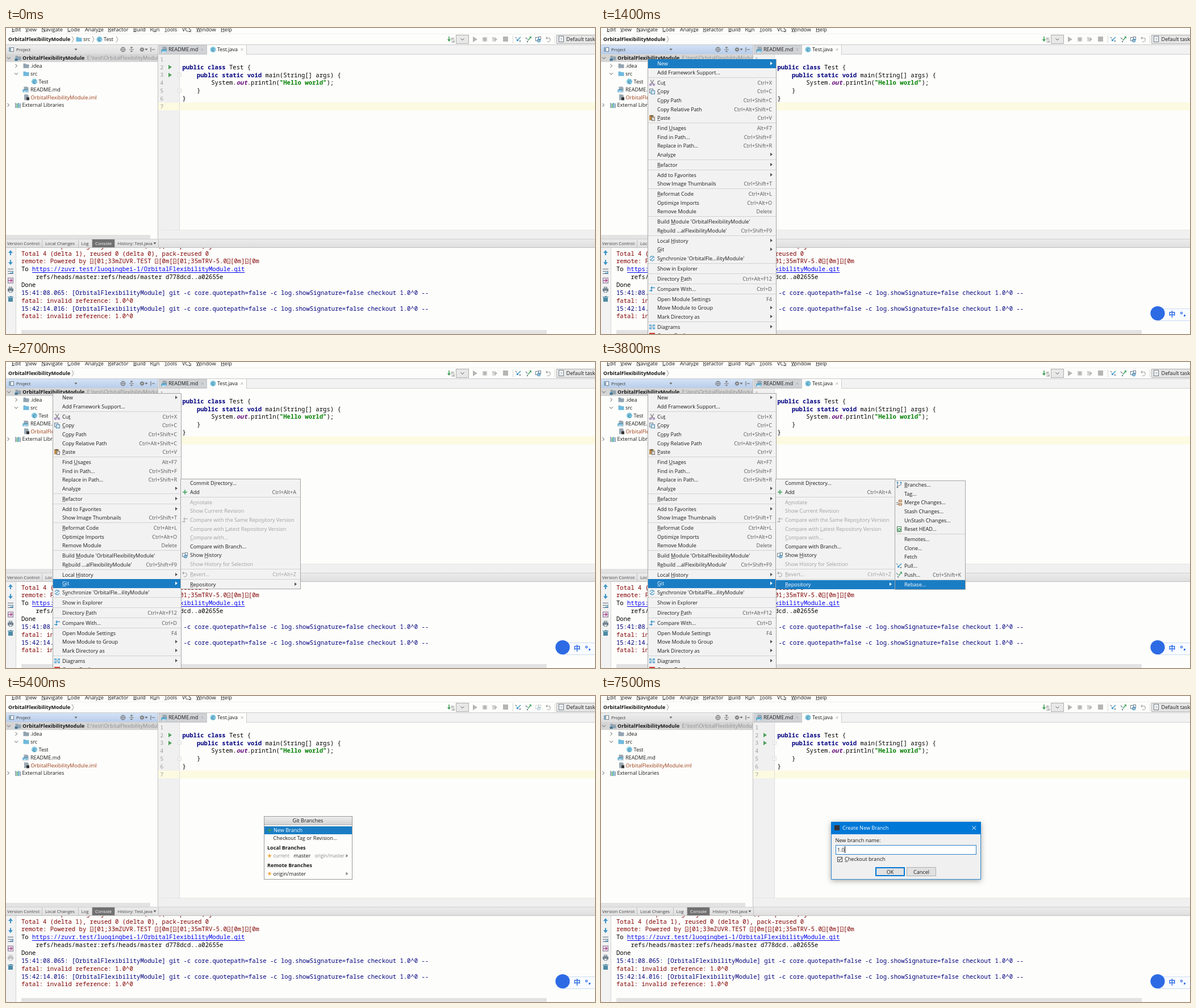
Recreate the animation shown at these times as an HTML page with a canvas. Size 1037x540 px, loop 8 s.

```html
<!DOCTYPE html>
<html lang="en">
<head>
<meta charset="utf-8">
<title>Creating a branch</title>
<style>
html, body { margin: 0; width: 100%; height: 100%; overflow: hidden; background: #fff; }
canvas { display: block; }
</style>
</head>
<body>
<canvas id="stage" width="1037" height="540"></canvas>
<script>
const ctx = document.getElementById('stage').getContext('2d');
const LOOP = 8000, ROW = 13.86;
const UI_FAMILY = '"Open Sans", "Noto Sans", sans-serif';
const MONO_FAMILY = '"Noto Sans Mono", "DejaVu Sans Mono", monospace';
const UI = `9.1px ${UI_FAMILY}`, BOLD = `bold 9px ${UI_FAMILY}`, SMALL = `7.8px ${UI_FAMILY}`, HINT = `8.3px ${UI_FAMILY}`;
const MONO = `10.58px ${MONO_FAMILY}`, MONO_BOLD = `bold ${MONO}`;
const PAPER = '#fdfdfb', INK = '#1a1a1a', GREY = '#8c8c8c', SELECT = '#1a7dc4';
const BLUE = '#3c94c8', GREEN = '#4aa564', STEEL = '#6e7f8c';
const PROJECT = 'OrbitalFlexibilityModule';

function rect(x, y, w, h, fill, border) {
  ctx.fillStyle = fill;
  ctx.fillRect(x, y, w, h);
  if (border) {
    ctx.strokeStyle = border;
    ctx.lineWidth = 1;
    ctx.strokeRect(x + .5, y + .5, w - 1, h - 1);
  }
}
function line(color, width, ...p) {
  ctx.strokeStyle = color;
  ctx.lineWidth = width;
  ctx.beginPath();
  for (let i = 0; i < p.length; i += 2) ctx.lineTo(p[i], p[i + 1]);
  ctx.stroke();
}
function shape(color, ...p) {
  ctx.fillStyle = color;
  ctx.beginPath();
  for (let i = 0; i < p.length; i += 2) ctx.lineTo(p[i], p[i + 1]);
  ctx.fill();
}
function disc(x, y, r, color) {
  ctx.fillStyle = color;
  ctx.beginPath();
  ctx.arc(x, y, r, 0, 7);
  ctx.fill();
}
function ring(x, y, r, color, from = 0, to = 6.3) {
  ctx.strokeStyle = color;
  ctx.lineWidth = 1.2;
  ctx.beginPath();
  ctx.arc(x, y, r, from, to);
  ctx.stroke();
}
function vGradient(x, y, w, h, top, bottom) {
  const g = ctx.createLinearGradient(0, y, 0, y + h);
  g.addColorStop(0, top);
  g.addColorStop(1, bottom);
  rect(x, y, w, h, g);
}
// Text is centred on y; "&" underlines the next character.
function text(s, x, y, color = INK, font = UI, align = 'left') {
  const mark = s.indexOf('&'), plain = s.replace('&', '');
  const base = y + (font.includes('Mono') ? 3.7 : 3.2);
  ctx.font = font;
  ctx.textAlign = align;
  ctx.fillStyle = color;
  ctx.fillText(plain, x, base);
  if (mark >= 0) {
    const from = ctx.measureText(plain.slice(0, mark)).width;
    ctx.fillRect(x + from, base + 1, ctx.measureText(plain[mark]).width, .6);
  }
  return x + ctx.measureText(plain).width;
}
const right = (x, y, c) => shape(c, x - 2, y - 3, x + 2, y, x - 2, y + 3);
const down = (x, y, c) => shape(c, x - 2.5, y - 1.5, x + 2.5, y - 1.5, x, y + 1.8);
const chevron = (x, y, open) => open
  ? line('#555', 1, x - 3, y - 1.5, x, y + 1.5, x + 3, y - 1.5)
  : line('#555', 1, x - 1.5, y - 3, x + 1.5, y, x - 1.5, y + 3);
const crumb = (x, y) => line('#999', 1, x - 1.5, y - 5.5, x + 1.5, y, x - 1.5, y + 5.5);

const page = () => shape('#9aa8b2', -4, -5, 2, -5, 4, -3, 4, 5, -4, 5);
const folder = color => shape(color, -5, -4, -1, -4, 0, -2.7, 5, -2.7, 5, 4, -5, 4);
function compare(color) {
  line(color, 1.4, 5, -2, -1, -2);
  shape(color, -3, -2, 0, -5, 0, 1);
  line(color, 1.4, -5, 3, -2, 3);
  shape(color, 1, 3, -2, 0, -2, 5);
}
function history(color) {
  rect(-5, -4, 7, 7, '#fff', color);
  rect(0, -5, 5, 6, '#fff', color);
  ring(1, 2, 2.6, BLUE);
}
const icons = {
  folder: () => folder('#92a3b0'),
  source: () => folder('#70b9dc'),
  module() { folder('#92a3b0'); rect(-6, 1, 5, 4, '#45799b'); },
  klass() { disc(0, 0, 5, '#7cc4e0'); text('C', 0, 0, '#2f5f78', `8px ${UI_FAMILY}`, 'center'); },
  doc() { page(); rect(-6, 0, 9, 5, '#3f9bc6'); text('MD', -5, 2.6, '#fff', `bold 5px ${UI_FAMILY}`); },
  iml() { page(); rect(0, 0, 5, 5, '#333'); },
  books() { ['#8fa0ae', '#52a86c', '#3f9bc6', '#8fa0ae'].forEach((c, i) => rect(-5 + i * 2.7, -4 + i % 2, 1.8, 9 - i % 2, c)); },
  cut() { line('#777', 1.2, -3, -5, 2, 3); line('#777', 1.2, 3, -5, -2, 3); ring(-3, 3.5, 1.5, '#8a66a8'); ring(3, 3.5, 1.5, '#8a66a8'); },
  copy() { rect(-5, -5, 7, 8, '#d9e4ea', STEEL); rect(-2, -2, 7, 7, '#d9e4ea', '#4b8db4'); },
  paste() { rect(-5, -5, 8, 9, '#bd8c4a'); rect(-3, -5, 4, 2, '#555'); rect(-1, -2, 6, 7, '#dadada', '#777'); },
  sync() { ring(0, 0, 4, BLUE, .3, 2.8); ring(0, 0, 4, BLUE, 3.4, 6); line(BLUE, 1.2, -2, 2, 2, -2); },
  compare: () => compare(BLUE),
  compareOff: () => compare('#b8b8b8'),
  diagram() { for (const x of [-5, 1]) for (const y of [-4, 1]) rect(x, y, 4, 3, '#e0edf3', BLUE); line(STEEL, 1, -1, 0, 1, 0); },
  red: () => rect(-5, -5, 10, 10, '#d23b35'),
  add() { line('#3a9b55', 1.5, -4, 0, 4, 0); line('#3a9b55', 1.5, 0, -4, 0, 4); },
  history: () => history(STEEL),
  historyOff() { ctx.globalAlpha = .4; history('#999'); ctx.globalAlpha = 1; },
  undo() { ring(0, 1, 3.3, '#ababab', -1.8, 2.2); line('#ababab', 1.2, -1, -2.2, -4, -2.2); shape('#ababab', -5, -2.2, -2, -5, -2, .6); },
  branch() { line('#8897a3', 1.2, -3, 4, -3, -3); line('#8897a3', 1.2, -3, 2, 3, 0, 3, -3); disc(-3, -4, 1.4, BLUE); disc(-3, 4, 1.4, STEEL); disc(3, -4, 1.4, BLUE); },
  merge() { rect(-1, -5, 6, 4, '#e8c9a8', '#a97849'); rect(-1, 1, 6, 4, '#e8c9a8', '#a97849'); line('#777', 1.2, -5, 0, -1, 0); line('#777', 1, -5, 3, -1, 3); },
  reset() { rect(-4, -5, 8, 10, '#eef3ee', '#4f7e5d'); ring(0, 1, 2.2, '#2c964b'); },
  pull() { line(BLUE, 1.5, 4, -4, -1, 1); shape(BLUE, -3, 3, -3, -1, 1, 3); line(STEEL, 1.2, -5, -4, -3, -2); disc(3, 3, 1.2, STEEL); },
  push() { line(GREEN, 1.5, -1, 2, 3, -3); shape(GREEN, 5, -5, 1, -5, 5, -1); line(STEEL, 1.2, -5, -3, -2, 0); disc(-2, 4, 1.2, STEEL); },
  up() { line(BLUE, 2, 0, 4, 0, -1); shape(BLUE, 0, -5, -4, 0, 4, 0); },
  down() { line(BLUE, 2, 0, -4, 0, 1); shape(BLUE, 0, 5, -4, 0, 4, 0); },
  wrap() { for (const y of [-4, 0, 4]) line(STEEL, 1.2, -5, y, 5, y); line(BLUE, 1.2, 4, 0, 4, 3, -1, 3); },
  end() { rect(-5, -5, 10, 10, '#e7dfe9', '#8b7594'); shape('#b44e93', 0, -3, 4, 0, 0, 3); line('#b44e93', 1.4, -4, 0, 0, 0); },
  print(color = STEEL) { rect(-3, -5, 6, 3, '#eee', color); rect(-5, -2, 10, 5, color); rect(-3, 1, 6, 4, '#fff', color); },
  printOff: () => icons.print('#bdbdbd'),
  trash() { rect(-4, -2, 8, 7, '#4d8ba5'); rect(-5, -4, 10, 1.4, '#4d8ba5'); rect(-1, -5, 3, 1, '#4d8ba5'); },
  star() {
    const p = [];
    for (let i = 0; i < 10; i++) { const a = i * Math.PI / 5, r = i % 2 ? 1.7 : 4; p.push(r * Math.sin(a), -r * Math.cos(a)); }
    shape('#f3aa45', ...p);
  },
  bug() { disc(0, 0, 3.4, '#b9b9b9'); for (const y of [-3, 0, 3]) line('#b9b9b9', 1, -4.5, y, 4.5, y); },
  cover() { rect(-5, -4, 6, 8, '#d8d8d8'); right(2, 0, '#b2b2b2'); line('#bebebe', 1, -5, -4, 1, 4); },
  gear() {
    for (let a = 0; a < 3; a += .785) {
      const x = 4 * Math.cos(a), y = 4 * Math.sin(a);
      line('#777', 1.4, x, y, -x, -y);
    }
    disc(0, 0, 2.8, '#777');
    disc(0, 0, 1.2, '#e4e4e4');
  },
  target() { ring(0, 0, 3.8, '#777'); line('#777', 1, -4, 0, 4, 0); line('#777', 1, 0, -4, 0, 4); },
  fold() { line('#777', 1, -4, 0, 4, 0); down(0, -3, '#777'); shape('#777', -2.5, 4, 2.5, 4, 0, 1.5); },
  hide() { line('#777', 1.2, -3, -4, -3, 4); line('#777', 1.2, -1, 0, 4, 0); }
};
function icon(name, x, y) {
  ctx.save();
  ctx.translate(x, y);
  icons[name]();
  ctx.restore();
}

// Items: "icon|label|shortcut"; ">" is a submenu, "!" a disabled label, "-" a separator.
const MAIN = { x: 82, y: 55, w: 227, first: 63, bottom: 545, items: [
  '|New|>', '|Add Framework Support...', '-',
  'cut|Cu&t|Ctrl+X', 'copy|&Copy|Ctrl+C', '|C&opy Path|Ctrl+Shift+C', '|Copy Relative Path|Ctrl+Alt+Shift+C', 'paste|&Paste|Ctrl+V', '-',
  '|Find &Usages|Alt+F7', '|Find in Path...|Ctrl+Shift+F', '|Replace in Path...|Ctrl+Shift+R', '|Analy&ze|>', '-',
  '|&Refactor|>', '-', '|Add to F&avorites|>', '|Show Image Thumbnails|Ctrl+Shift+T', '-',
  '|&Reformat Code|Ctrl+Alt+L', '|Optimi&ze Imports|Ctrl+Alt+O', '|Remove Module|Delete', '-',
  `|Build &Module '${PROJECT}'`, `|R&ebuild ...${PROJECT.slice(-19)}'|Ctrl+Shift+F9`, '-',
  '|Local &History|>', '|&Git|>', `sync|S&ynchronize '${PROJECT.slice(0, 10)}...${PROJECT.slice(-11)}'`, '-',
  '|Show in Explorer', '-', '|Directory &Path|Ctrl+Alt+F12', '-', 'compare|Compare With...|Ctrl+D', '-',
  '|Open Module Settings|F4', '|Move Module to Group|>', '|Mark Directory as|>', '-',
  'diagram|Diagrams|>', 'red|Create Draft...' ] };
const GIT = { x: 307, y: 206, w: 212, first: 214, bottom: 401, items: [
  '|Commit D&irectory...', 'add|Add|Ctrl+Alt+A', '-', '|!A&nnotate', '|!Show Current Revision',
  'compareOff|!Compare with the Same Repo&sitory Version', '|!Compare with &Latest Repository Version',
  '|!&Compare with...', '|Compare with Branch...', 'history|Show &History', '|!Show History for Selection', '-',
  'undo|!&Revert...|Ctrl+Alt+Z', '-', '|&Repository|>' ] };
const REPO = { x: 517, y: 209, w: 125, first: 217, bottom: 402, items: [
  'branch|&Branches...', '|Tag...', 'merge|Merge Changes...', '|Stash Changes...', '|UnStash Changes...',
  'reset|Reset HEAD...', '-', '|Remotes...', '|Clone...', '|Fetch', 'pull|Pull...', 'push|Push...|Ctrl+Shift+K', '-', '|Rebase...' ] };

function drawMenu({ x, y, w, first, bottom, items }, hover) {
  rect(x, y, w, bottom - y, '#f2f2f2', '#a6a6a6');
  let cy = first;
  for (const item of items) {
    if (item === '-') {
      rect(x + 1, Math.round(cy - 7.3), w - 2, 1, '#d2d2d2');
      cy += 2.3;
      continue;
    }
    const [name, label, keys = ''] = item.split('|');
    const plain = label.replace('&', ''), off = label[0] === '!';
    const hot = hover.some(h => plain.startsWith(h));
    if (hot) rect(x + 1, Math.round(cy - 8), w - 2, 16, SELECT);
    if (name) icon(name, x + 8, cy);
    text(label.replace('!', ''), x + 17, cy, hot ? '#fff' : off ? '#a0a0a0' : INK);
    if (keys === '>') right(x + w - 9, cy - .5, hot ? '#fff' : '#555');
    else text(keys, x + w - 8, cy, hot ? '#fff' : off ? '#a0a0a0' : '#555', UI, 'right');
    cy += 15.6;
  }
}

function drawToolbar(s) {
  const menus = { '&Edit': 10, '&View': 34, '&Navigate': 62.5, '&Code': 108, 'Analy&ze': 139, '&Refactor': 179.5, '&Build': 224,
    'R&un': 253.5, '&Tools': 279, 'VC&S': 310, '&Window': 335, '&Help': 378 };
  for (const name in menus) text(name, menus[name], 2.3, INK, `9.2px ${UI_FAMILY}`);
  rect(0, 10, 1037, 1, '#f0f0f0');
  text(PROJECT, 4, 20, INK, BOLD);
  crumb(117.5, 20);
  if (s.crumbs) {
    icon('source', 128.5, 20);
    text('src', 136, 20);
    crumb(153.5, 20);
    icon('klass', 164.5, 20);
    text('Test', 172, 20);
    crumb(195.5, 20);
  }
  line('#389b50', 1.5, 780, 15, 780, 22);
  shape('#389b50', 777, 20, 783, 20, 780, 24);
  text('01', 784, 17, '#555', `5px ${MONO_FAMILY}`);
  text('10', 784, 22, '#555', `5px ${MONO_FAMILY}`);
  rect(792, 12, 23, 16, '#e8e8e8', '#adadad');
  chevron(803.5, 20, true);
  shape('#b5b5b5', 822, 15, 830, 20, 822, 25);
  icon('bug', 843, 20);
  icon('cover', 861, 20);
  rect(875, 15, 9, 9, '#b5b5b5');
  for (const x of [892, 966]) rect(x, 13, 1, 14, '#d8d8d8');
  icon('pull', 902, 20);
  icon('push', 920, 20);
  icon(s.busy ? 'historyOff' : 'history', 937, 20);
  icon('undo', 955, 20);
  rect(969, 12, 70, 16, '#e6e6e6', '#b0b0b0');
  rect(973, 14, 9, 11, '#f5f5f5', STEEL);
  text('?', 977.5, 20, STEEL, SMALL, 'center');
  text('Default task', 986.5, 20);
}

function drawTree(s) {
  vGradient(0, 30, 267, 16, s.focus ? '#d3e2f5' : '#eeeeee', s.focus ? '#b9cdea' : '#dedede');
  rect(0, 29, 1037, 1, '#c8c8c8');
  rect(5, 34, 9, 8, '#f4f4f4', STEEL);
  rect(5, 34, 4, 8, '#88a6b8');
  text('Project', 18, 38, '#333', SMALL);
  down(123, 38, '#666');
  icon('target', 206, 38);
  icon('fold', 221, 38);
  icon('gear', 239.5, 38);
  down(247, 38, '#666');
  icon('hide', 258, 38);

  rect(0, 46, 267, 319, PAPER);
  rect(0, 365, 254, 7, '#e3e3e3');
  rect(267, 30, 1, 342, '#c4c4c4');
  const rowWidth = s.hint ? 281 : 267;
  rect(0, 46, rowWidth, 14, s.row ? SELECT : '#d5d5d5');
  ctx.save();
  ctx.beginPath();
  ctx.rect(0, 46, rowWidth, 320);
  ctx.clip();
  chevron(5, 53, true);
  icon('module', 21.5, 53);
  text(PROJECT, 29, 53, s.row ? '#fff' : INK, BOLD);
  text(`E:\\test\\${PROJECT}`, 142.5, 53, s.row ? '#fff' : GREY);
  const rows = [[35.5, 'folder', '.idea'], [35.5, 'source', 'src'], [50, 'klass', 'Test'], [35.5, 'doc', 'README.md'],
    [36, 'iml', PROJECT + '.iml'], [21, 'books', 'External Libraries']];
  rows.forEach(([x, name, label], i) => {
    const y = 53 + ROW * (i + 1);
    icon(name, x, y);
    text(label, x + 7.5, y, name === 'iml' ? '#9b3c14' : INK);
  });
  chevron(18, 66.8, false);
  chevron(18, 80.7, true);
  chevron(4, 136, false);
  ctx.restore();
}

function drawEditor() {
  rect(268, 30, 769, 17, '#f2f2f2');
  rect(268, 46, 769, 1, '#d0d0d0');
  rect(269, 30, 85, 16, '#d0d2d6', '#c4c6ca');
  rect(354, 30, 70, 17, PAPER);
  rect(423, 30, 1, 17, '#cccccc');
  icon('doc', 279.5, 38);
  icon('klass', 364.5, 38);
  text('README.md', 286, 38, INK, `9px ${UI_FAMILY}`);
  text('Test.java', 372, 38, INK, `9px ${UI_FAMILY}`);
  for (const x of [345.5, 415.5]) {
    line('#b0b0b0', 1, x - 2, 36, x + 2, 40);
    line('#b0b0b0', 1, x + 2, 36, x - 2, 40);
  }
  rect(268, 47, 769, 310, PAPER);
  rect(268, 47, 37, 310, '#f0f0f0');
  rect(268, 131.5, 769, 13.8, '#fcfae0');
  rect(305, 47, 1, 310, '#dedede');
  rect(268, 356, 769, 16, '#f0f0f0');
  rect(268, 356, 769, 1, '#e6e6e6');
  for (let i = 0; i < 7; i++) text(String(i + 1), 271.5, 55 + ROW * i, '#999', `9.6px ${MONO_FAMILY}`);
  for (const y of [69, 83]) shape('#4f9f5e', 286, y - 4, 292, y, 286, y + 4);
  for (const y of [83, 111]) {
    rect(302, y - 4, 7, 7, PAPER, '#dcdcdc');
    line('#c4c4c4', 1, 304, y - .5, 307, y - .5);
  }
  const KEY = ['#000080', MONO_BOLD], PLAIN = ['#000', MONO];
  const lines = [
    [['public class ', ...KEY], ['Test {', ...PLAIN]],
    [['    public static void ', ...KEY], ['main(String[] args) {', ...PLAIN]],
    [['        System.', ...PLAIN], ['out', '#660e7a', 'italic ' + MONO_BOLD], ['.println(', ...PLAIN], ['"Hello world"', '#008000', MONO_BOLD], [');', ...PLAIN]],
    [['    }', ...PLAIN]],
    [['}', ...PLAIN]]
  ];
  lines.forEach((parts, i) => {
    let x = 310.5;
    for (const [word, color, font] of parts) x = text(word, x, 69 + ROW * i, color, font);
  });
}

function drawConsole(s) {
  vGradient(0, 372, 1037, 16, '#ececec', '#dedede');
  rect(0, 372, 1037, 1, '#cfcfcf');
  rect(0, 387, 1037, 1, '#c0c0c0');
  rect(152, 373, 39, 14, '#717171');
  for (const x of [63, 127, 151, 191, 268]) rect(x, 373, 1, 14, '#c2c2c2');
  const tabs = { 'Version Control:': 2, 'Local Changes': 69, 'Log': 132.5, 'Console': 157, 'History: Test.java': 196.5 };
  for (const name in tabs) text(name, tabs[name], 380, name === 'Console' ? '#fff' : '#444', SMALL);
  down(262, 380, '#555');

  rect(18, 388, 1019, 152, PAPER);
  rect(0, 388, 17, 152, '#f2f2f2');
  rect(17, 388, 1, 152, '#d6d6d6');
  rect(27, 533, 925, 7, '#e3e3e3');
  ['up', 'down', 'wrap', 'end', s.busy ? 'printOff' : 'print', 'trash'].forEach((name, i) => icon(name, 8, 397 + 16.2 * i));

  const RED = '#7f0000', NAVY = '#00007f';
  const command = `[${PROJECT}] git -c core.quotepath=false -c log.showSignature=false checkout 1.0^0 --`;
  const log = [
    ['remote: Compressing objects: 100% (3/3), completed, j.', RED],
    ['Total 4 (delta 1), reused 0 (delta 0), pack-reused 0', RED],
    ['remote: Powered by ~[01;33mZUVR.TEST ~[0m[~[01;35mTRV-5.0~[0m]~[0m', RED],
    ['To ', '#000'],
    ['    refs/heads/master:refs/heads/master d778dcd..a02655e', '#000'],
    ['Done', '#000'],
    ['15:41:08.065: ' + command, NAVY],
    ['fatal: invalid reference: 1.0^0', RED],
    ['15:42:14.016: ' + command, NAVY],
    ['fatal: invalid reference: 1.0^0', RED]
  ];
  ctx.save();
  ctx.beginPath();
  ctx.rect(18, 388, 1019, 145);
  ctx.clip();
  log.forEach(([entry, color], i) => {
    const y = 384 + ROW * i;
    text(entry.replaceAll('~', ' '), 27, y, color, MONO);
    // "~" marks an escape character, shown as a boxed question mark.
    [...entry].forEach((c, k) => {
      if (c !== '~') return;
      const x = 27 + k * 6.35;
      ctx.strokeStyle = color;
      ctx.lineWidth = .7;
      ctx.strokeRect(x + .8, y - 4, 4.8, 8);
      text('?', x + 3.2, y, color, `6px ${UI_FAMILY}`, 'center');
    });
  });
  const linkY = 384 + ROW * 3;
  const end = text(`https://zuvr.test/luoqingbei-1/${PROJECT}.git`, 46, linkY, '#0000f0', MONO);
  rect(46, Math.round(linkY + 5), end - 46, 1, '#0000f0');
  ctx.restore();
}

function drawBranches() {
  rect(454, 212, 156, 112, PAPER, '#9a9a9a');
  vGradient(455, 213, 154, 14, '#eeeeee', '#d2d2d2');
  rect(455, 227, 154, 1, '#b5b5b5');
  text('Git Branches', 531.5, 219.7, INK, UI, 'center');
  rect(455, 230, 154, 14, SELECT);
  icon('add', 464, 237);
  text('New Branch', 471, 237, '#fff');
  text('Checkout Tag or Revision...', 470.5, 251);
  text('Local Branches', 460, 267.7, INK, BOLD);
  icon('star', 464, 282);
  text('current', 470.5, 282, GREY, HINT);
  text('master', 506.5, 282);
  text('origin/master', 596, 282, GREY, HINT, 'right');
  text('Remote Branches', 460, 299, INK, BOLD);
  icon('star', 464, 313.5);
  text('origin/master', 470.5, 313.5);
  for (const y of [282, 313.5]) right(600.5, y, '#888');
}

function drawDialog(s) {
  ctx.save();
  ctx.shadowColor = 'rgba(0,0,0,.35)';
  ctx.shadowBlur = 9;
  ctx.shadowOffsetY = 2;
  rect(405, 222, 264, 102, '#f0f0f0');
  ctx.restore();
  rect(405, 222, 264, 102, '#f0f0f0', '#2b86cf');
  rect(405, 222, 264, 22, '#0078d7');
  rect(411, 228, 9, 9, '#33323a');
  text('Create New Branch', 425, 233, '#fff');
  line('#fff', 1, 653.5, 229.5, 660, 236);
  line('#fff', 1, 660, 229.5, 653.5, 236);
  text('New branch name:', 412.5, 254.5);
  rect(413, 263, 248, 17, '#fff', '#2c82c9');
  const end = text(s.typed, 416, 271.5);
  if (s.caret) rect(Math.round(end), 265, 1, 12, '#000');
  rect(416, 284, 9, 9, '#fff', '#444');
  line('#333', 1.1, 418, 288.5, 420, 290.5, 423.5, 286);
  text('&Checkout branch', 429, 288);
  rect(483, 302, 52, 16, '#e1e1e1', s.typed ? '#0078d7' : '#c2c2c2');
  if (s.typed.length > 1) rect(484, 303, 50, 14, '#e1e1e1', '#0078d7');
  text('OK', 509, 310.3, s.typed ? INK : '#a0a0a0', UI, 'center');
  rect(538, 302, 52, 16, '#e1e1e1', '#b0b0b0');
  text('Cancel', 564, 310.3, INK, UI, 'center');
}

function drawInputBar() {
  rect(980, 495, 58, 22, '#f8fbff', '#cbdcf5');
  disc(980, 503.5, 12.6, '#2d6be5');
  text('中', 1005.5, 506.5, '#2d6be5', 'bold 12px "Noto Sans CJK SC", "Noto Sans CJK", sans-serif', 'center');
  ring(1022, 503, 1.6, '#2d6be5');
  shape('#2d6be5', 1026, 506, 1029, 506, 1029, 508, 1026.5, 510);
}

// Last value whose start time has passed.
const pick = (t, ...steps) => steps.reduce((value, [start, next]) => t >= start ? next : value, []);

function draw(t) {
  const within = (from, to) => t >= from && t < to;
  const state = {
    focus: within(700, 5800),
    row: within(700, 1100) || within(5000, 5100),
    hint: within(800, 1100),
    crumbs: t < 1100,
    busy: within(5400, 5900),
    caret: !within(6400, 6800),
    typed: '1.0'.slice(0, pick(t, [0, 0], [7200, 1], [7400, 2], [7500, 3]))
  };
  rect(0, 0, 1037, 540, PAPER);
  drawToolbar(state);
  drawEditor();
  drawTree(state);
  drawConsole(state);
  if (within(1200, 5000)) {
    drawMenu(MAIN, pick(t, [1400, ['New']], [1600, ['Add Framework']], [1800, ['Paste', 'Find Usages']],
      [1900, ['Optimize']], [2000, ['Show in']], [2500, ['Git']]));
    if (t >= 2700) drawMenu(GIT, pick(t, [3300, ['Repository']]));
    if (t >= 3500) drawMenu(REPO, pick(t, [3800, ['Rebase']], [3900, ['Pull']], [4100, ['Clone']], [4200, ['Reset']],
      [4300, ['UnStash']], [4400, ['Merge']], [4600, ['Tag']], [4700, ['Branches']]));
  }
  if (within(5400, 5800)) drawBranches();
  if (t >= 5900) drawDialog(state);
  if (t >= 900) drawInputBar();
}

function frame() {
  draw(performance.now() % LOOP);
  requestAnimationFrame(frame);
}
frame();
</script>
</body>
</html>
```
